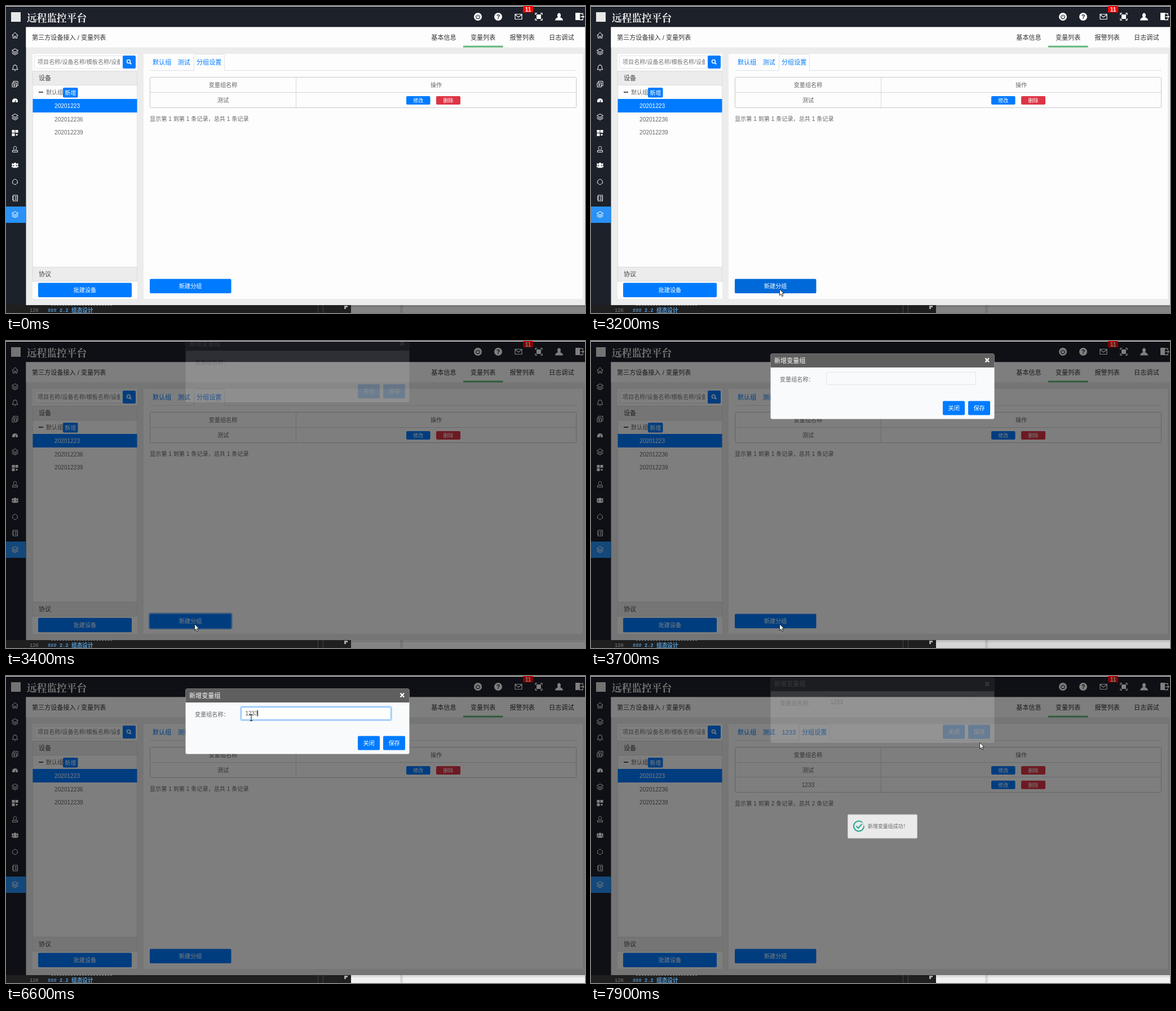
Recreate the animation shown at these times as an HTML page. Size 1027 px wide and 545 px high, loop 8000 ms.

```html
<!DOCTYPE html>
<html lang="zh">
<head>
<meta charset="utf-8">
<style>
html, body { margin: 0; width: 100%; height: 100%; overflow: hidden; background: #ececec; }
svg { display: block; font-family: "Liberation Sans", "Noto Sans CJK SC", "Noto Sans CJK", sans-serif; }
.brand { font-family: "Noto Serif CJK SC", "Noto Sans CJK SC", "Noto Sans CJK", serif; font-weight: 600; }
.code { font-family: "Liberation Mono", "Noto Sans CJK SC", "Noto Sans CJK", monospace; font-weight: 700; }
</style>
</head>
<body>
<svg id="stage" width="1027" height="545" viewBox="0 0 1027 545"></svg>
<script>
const LOOP = 8000, STEP = 100;
const BLUE = '#007bff', HOVER = '#0069d9', RED = '#dc3545', DARK = '#1d212a', GREY = '#666', LINE = '#dee2e6';
const BIG = 11.1, MID = 10.15, SMALL = 8.96;

const clamp = v => Math.max(0, Math.min(1, v));
const easeOut = u => 1 - (1 - clamp(u)) ** 1.7;

const rect = (x, y, w, h, fill, r = 0, more = '') =>
  `<rect x="${x}" y="${y}" width="${w}" height="${h}" rx="${r}" fill="${fill}" ${more}/>`;
const box = (x, y, w, h, fill, stroke, r = 0) =>
  rect(x + .5, y + .5, w - 1, h - 1, fill, r, `stroke="${stroke}"`);
const path = (d, stroke, more = '') => `<path d="${d}" fill="none" stroke="${stroke}" ${more}/>`;
// y is the middle of the glyphs
const text = (s, x, y, size, fill, more = '') =>
  `<text x="${x}" y="${y + size * .37}" font-size="${size}" fill="${fill}" ${more}>${s}</text>`;
const label = (s, x, y, size, fill, more = '') => text(s, x, y, size, fill, 'text-anchor="middle" ' + more);
const at = (x, y, s) => `<g transform="translate(${x} ${y})">${s}</g>`;
const fade = (alpha, s) => `<g opacity="${alpha}">${s}</g>`;
const button = (s, x, y, w, h, fill = BLUE, size = MID) =>
  rect(x, y, w, h, fill, 2) + label(s, x + w / 2, y + h / 2, size, '#fff');
const ring = (x, y, w, h, alpha) =>
  rect(x - 1, y - 1, w + 2, h + 2, 'none', 3, `stroke="${BLUE}" stroke-opacity="${alpha}" stroke-width="2"`);

const layers = 'M0-5 5.5-2 0 1-5.5-2zM-5.5.6 0 3.4 5.5.6M-5.5 3 0 5.8 5.5 3';
const sideIcons = [
  ['M-5.5.5 0-5 5.5.5M-3.7-1V5H-1V1.5H1V5H3.7V-1'],
  [layers],
  ['M-5 3H5L3.5 1V-1.5A3.5 3.5 0 0 0-3.5-1.5V1zM-1 5H1M0-6V-5'],
  ['M-5-2H2.5V5H-5zM-3-2V-5H5V3H2.5M-3.5 1.5H1M-1.3-.7V3.7'],
  ['M-4.5 3.5A5 5 0 1 1 4.5 3.5H1L2-2-1 3.5z', 1],
  [layers],
  ['M-5.500-5.500H-.5V-.5H-5.500zM.5-5.500H5.500V-.5H.5zM-5.500.5H-.5V5.500H-5.500zM1.500 1.500H4.500V4.500H1.500z', 1],
  ['M-1.5 1C-4-4-2-5 0-5S4-4 1.5 1M-4.5 2H4.5V5H-4.5z'],
  ['M-1.5 0A2.5 2.8 0 1 1 1.5 0L4 2V4H-4V2zM-4.500-.5A1.700 1.700 0 1 1-3-1L-4.500 3H-6V1zM4.500-.5A1.700 1.700 0 1 0 3-1L4.500 3H6V1z', 1],
  ['M-4 2A4.4 4.4 0 0 1-1.5-4M1.5-4A4.4 4.4 0 0 1 4 2M-2.5 4A4.4 4.4 0 0 0 2.5 4M-5 2.5H-3M3 2.5H5M-1-4.5H1'],
  ['M-3.5-5H4.5V5H-3.5zM-5-2.5H-2.5M-5 0H-2.5M-5 2.5H-2.5M-.5-2.5H3M-.5 0H3M-.5 2.5H3'],
  [layers],
];

function topBar() {
  const white = '#fff';
  const disc = '<circle r="7" fill="#fff"/>';
  return rect(0, 0, 1027, 1, '#f0f0f0') + rect(0, 1, 1027, 36.5, DARK)
    + rect(9, 11, 17, 17, '#e8e8e8')
    + text('远程监控平台', 37, 21, 17.7, '#eee', 'class="brand"')
    + at(837, 19, disc + path('M-2-2.5A3.4 3.4 0 1 0 2-2.5M0-4V0', DARK, 'stroke-width="1.2"'))
    + at(873, 19, disc + label('?', 0, 0, 11, DARK, 'font-weight="700"'))
    + at(909, 19, path('M-6-4.5H6V4.5H-6zM-6-4 0 1 6-4', white, 'stroke-width="1.2"'))
    + at(945, 19, rect(-4, -4, 8, 8, white) + path('M-6-3V-6H-3M3-6H6V-3M6 3V6H3M-3 6H-6V3', white, 'stroke-width="1.3"'))
    + at(981, 19, '<path d="M-2 1C-4-2-3-6.5 0-6.5S4-2 2 1Q7 3 7 6.5H-7Q-7 3-2 1z" fill="#fff"/>')
    + at(1016, 19, rect(-6, -7, 8, 13, white) + path('M2-5.5H7V-3M7 3V5.5H2M3 0H9M7-2 9 0 7 2', white, 'stroke-width="1.5"'))
    + rect(917, 0, 18, 11.5, '#f00', 1) + label('11', 926, 6, 10, white, 'font-weight="700"');
}

function sideBar() {
  const icons = sideIcons.map(([d, solid], i) =>
    at(16, 52 + i * 28.9, `<path d="${d}" fill="${solid ? '#fff' : 'none'}" stroke="#fff" stroke-width="${solid ? 0 : 1}"/>`));
  return rect(0, 37, 35.5, 494, DARK) + rect(0, 356, 35.5, 29, '#2991f7') + icons.join('');
}

function header() {
  const tabs = ['基本信息', '变量列表', '报警列表', '日志调试'];
  return rect(35.5, 37.5, 991.5, 36, '#fdfdfd')
    + text('第三方设备接入 / 变量列表', 46, 55.5, BIG, '#333')
    + tabs.map((s, i) => label(s, 776.5 + i * 69.6, 55.5, BIG, '#333')).join('')
    + rect(811, 70.5, 70.5, 3, '#5fb878');
}

function devicePanel() {
  const heading = (s, y) => box(47, y, 186, 26, '#ececec', '#dcdcdc') + text(s, 58, y + 13, BIG, '#444');
  return rect(47, 85, 186, 435, '#fdfdfd')
    + path('M47.5 115V488M232.5 115V488', '#e2e2e2')
    + box(50, 88, 158, 23, '#fff', '#dfe3e7', 2)
    + `<svg x="56" y="88" width="146" height="23">${text('项目名称/设备名称/模板名称/设备', 0, 11.5, MID, '#777')}</svg>`
    + rect(207, 88, 23, 23, BLUE, 2)
    + at(218, 99, '<circle cx="-.5" cy="-.5" r="3" fill="none" stroke="#fff" stroke-width="1.5"/>' + path('M1.7 1.7 4.3 4.3', '#fff', 'stroke-width="1.8"'))
    + heading('设备', 115)
    + rect(58, 152, 8, 2, '#555') + text('默认组', 71, 153, MID, GREY)
    + button('新增', 101, 145, 26.5, 17.5)
    + rect(47.5, 165, 185, 24, BLUE)
    + text('20201223', 86, 177, MID, '#fff')
    + text('202012236', 86, 201, MID, GREY)
    + text('202012239', 86, 224.5, MID, GREY)
    + heading('协议', 463)
    + button('批建设备', 57, 491.5, 166, 25.5);
}

function groupPanel(t) {
  const groups = t >= 7800 ? ['测试', '1233'] : ['测试'];
  const n = groups.length, tabX = n > 1 ? 369 : 333, bottom = 154.5 + 26 * n;
  const row = (name, i) => {
    const y = 167.5 + i * 25.8;
    return path(`M255 ${153.5 + i * 26}H1012`, '#d3d7db') + label(name, 385, y, MID, GREY)
      + button('修改', 710, y - 7.5, 42.5, 15, BLUE, SMALL)
      + button('删除', 763, y - 7.5, 43, 15, RED, SMALL);
  };
  return rect(244, 85, 779, 435, '#fdfdfd')
    + path(`M255 114.5H${tabX + .5}V87.5Q${tabX + .5} 85.5 ${tabX + 2.5} 85.5H${tabX + 52.5}Q${tabX + 54.5} 85.5 ${tabX + 54.5} 87.5V114.5H1012`, LINE)
    + text('默认组', 260, 99.5, BIG, BLUE) + text('测试', 304.5, 99.5, BIG, BLUE)
    + (n > 1 ? text('1233', 338.5, 99.5, BIG, BLUE) : '')
    + text('分组设置', tabX + 5, 99.5, BIG, BLUE)
    + label('变量组名称', 385, 140, MID, GREY) + label('操作', 763, 140, MID, GREY)
    + groups.map(row).join('')
    + path(`M514.5 127V${bottom}`, '#d3d7db')
    + rect(255.5, 126.5, 756, bottom - 126.5, 'none', 2, 'stroke="#c3c7cb"')
    + text(`显示第 1 到第 ${n} 条记录，总共 ${n} 条记录`, 255, bottom + 20, MID, GREY)
    + button('新建分组', 255, 484.5, 144.5, 25.5, t >= 900 && t < 3400 ? HOVER : BLUE)
    + (t >= 3300 && t < 3700 ? ring(255, 484.5, 144.5, 25.5, .55) : '');
}

// strip of the windows behind, below the page
function desktop(t) {
  const g = Math.round(132 + 108 * clamp((t - 3400) / 400));
  return rect(0, 531, 612, 14, '#1f1f1f')
    + text('126', 42, 540, 8.8, '#858585', 'class="code" style="font-weight:400"')
    + text('### 2.2', 74, 540, 8.75, '#569cd6', 'class="code"')
    + text('组态设计', 116, 540, 9.7, '#569cd6', 'class="code"')
    + path('M80 531.5H190', '#777', 'stroke-dasharray="3 2"')
    + rect(553, 531, 1, 14, '#444') + rect(562, 531, 1, 14, '#444')
    + rect(600, 532, 6, 3, '#aaa') + rect(600, 535, 3, 3, '#aaa')
    + rect(612, 531, 415, 14, `rgb(${g},${g},${g})`)
    + rect(612, 531, 415, 4, '#000', 0, 'opacity=".08"')
    + rect(699, 531, 5, 14, '#000', 0, 'opacity=".1"')
    + (t >= 4100 && t < 6200 ? rect(795, 542, 61, 2, '#dcdcdc') : '');
}

function dialog(t) {
  const opening = t - 3380, closing = t - 7775;
  if (opening < 0) return '';
  const alpha = closing > 0 ? clamp(1 - closing / 150) : clamp(opening / 150);
  const lift = 33.5 * (closing > 0 ? easeOut(closing / 300) : 1 - easeOut(opening / 300));
  const typed = '1233'.slice(0, [6000, 6200, 6500, 6600].filter(k => t >= k).length);
  const focused = t >= 4800 && t < 7700;
  const caret = focused && (t < 5200 || t >= 5700 && t < 7100);
  return fade(alpha, at(0, -lift,
    rect(318.5, 22.5, 397, 116, '#f9fafc', 3)
    + '<path d="M318.5 47V25.5Q318.5 22.5 321.5 22.5H712.5Q715.5 22.5 715.5 25.5V47z" fill="#5f5f5f"/>'
    + text('新增变量组', 325, 34.5, BIG, '#fff')
    + path('M699.5 30.5 706 37.5M706 30.5 699.5 37.5', '#fff', 'stroke-width="2.2"')
    + text('变量组名称：', 335, 68.5, MID, GREY)
    + (focused ? ring(417, 55, 266, 23, .28) : '')
    + box(417, 55, 266, 23, focused ? '#fff' : '#f9fafc', focused ? '#80bdff' : '#e2e6ea', 2.5)
    + text(typed, 424.5, 66.5, 10, '#555')
    + (caret ? rect(424 + Math.round(typed.length * 5.6), 60.5, 1, 11.5, '#222') : '')
    + button('关闭', 624, 106.5, 39, 25)
    + button('保存', 669, 106.5, 39, 25, t >= 7400 && t < 7800 ? HOVER : BLUE)
    + (t === 7700 ? ring(669, 106.5, 39, 25, .5) : '')));
}

function toast(t) {
  if (t < 7800) return '';
  return fade(clamp((t - 7690) / 250),
    box(455, 245.5, 124, 43, '#fff', '#d3d4d3', 1.5)
    + '<circle cx="475" cy="266.5" r="9" fill="none" stroke="#c9e8e1" stroke-width="1.8"/>'
    + path('M481 259.8A9 9 0 1 0 484 266.5M470.5 266.5 474 270 480.5 263', '#1bb394', 'stroke-width="2"')
    + text('新增变量组成功！', 491, 266.5, SMALL, GREY));
}

// time, x, y of the pointer tip
const moves = [
  [100, 1006, 28], [200, 942, 48], [300, 872, 79], [600, 478, 304], [700, 412, 370], [800, 355, 458],
  [900, 330, 502], [1000, 334.5, 502.5], [4000, 334.5, 502.5], [4200, 360, 400], [4300, 390, 260],
  [4400, 418, 140], [4500, 433.5, 80], [4700, 435, 74], [6900, 435, 74], [7000, 438, 75],
  [7200, 550, 96], [7400, 684, 119], [7500, 689.5, 118], [LOOP, 689.5, 118],
];

function pointer(t) {
  const i = moves.findIndex(m => m[0] > t);
  if (i < 1) return '';
  const [t0, x0, y0] = moves[i - 1], [t1, x1, y1] = moves[i];
  const u = (t - t0) / (t1 - t0), x = x0 + (x1 - x0) * u, y = y0 + (y1 - y0) * u;
  const overField = t > 4000 && x > 417 && x < 683 && y > 55 && y < 78;
  return at(x, y, overField
    ? path('M-2.5-5.5H2.5M0-5.5V5.5M-2.5 5.5H2.5', '#111')
    : '<path d="M0 0V11.3L2.6 8.9 4.4 13 6.3 12.2 4.5 8.2H8z" fill="#fff" stroke="#111" stroke-width=".9"/>');
}

function scene(t) {
  const shade = clamp((t - 3237) / 150) / 2;
  return rect(35, 37, 992, 494, '#ececec') + topBar() + sideBar() + header() + devicePanel() + groupPanel(t)
    + rect(0, 1, 1027, 530, '#000', 0, `opacity="${shade}"`)
    + desktop(t) + dialog(t) + toast(t) + pointer(t);
}

const stage = document.getElementById('stage');
const start = performance.now();
let shown = -1;

function play() {
  const t = Math.floor((performance.now() - start) % LOOP / STEP) * STEP;
  if (t !== shown) stage.innerHTML = scene(shown = t);
  requestAnimationFrame(play);
}
play();
</script>
</body>
</html>
```
